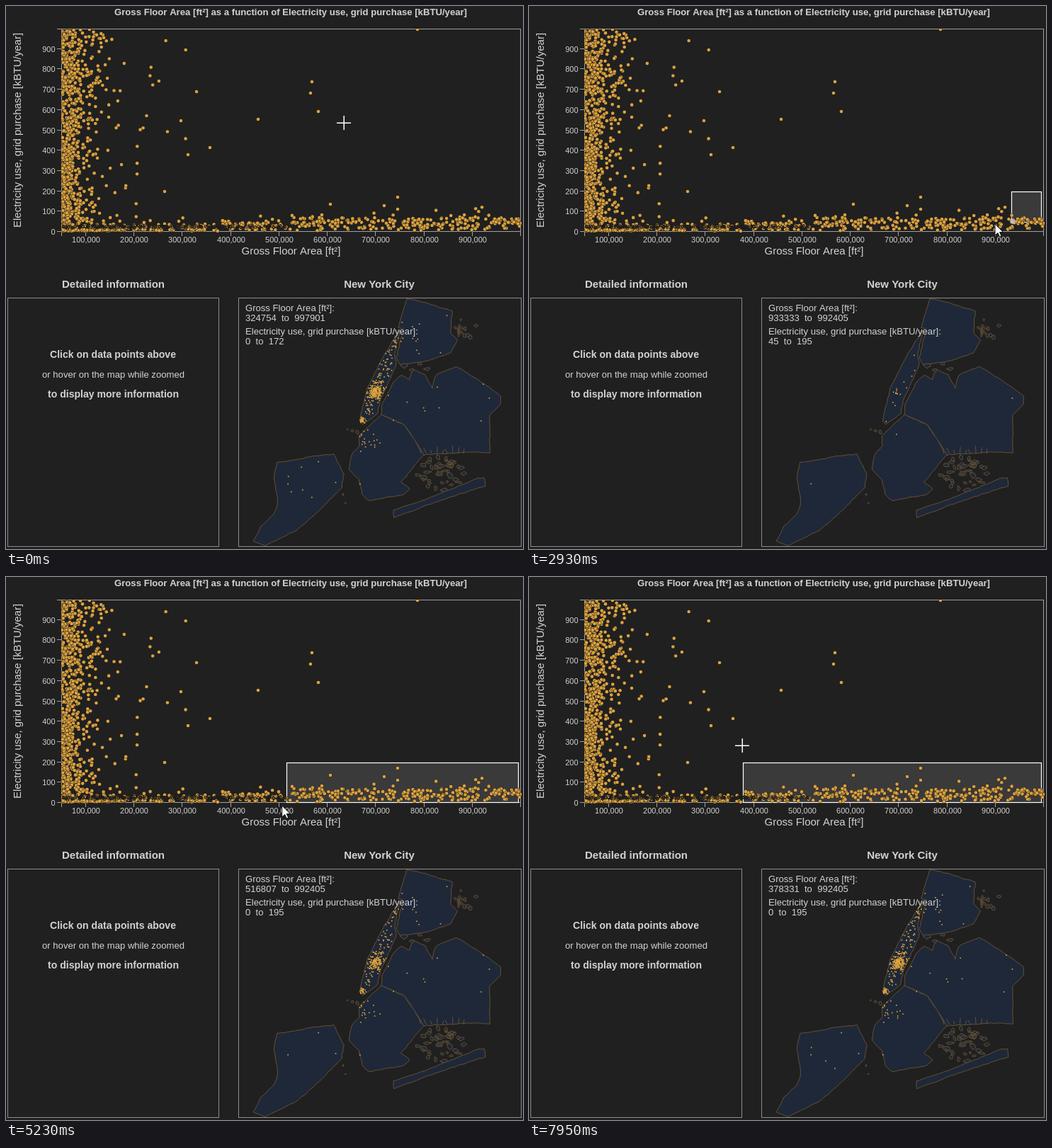
Animation, 730 px wide and 767 px high, one loop 8000 ms. Source, as an HTML page with a canvas:

```html
<!DOCTYPE html>
<html lang="en">
<head>
<meta charset="utf-8">
<title>Building energy explorer</title>
<style>
html, body { margin: 0; width: 100%; height: 100%; overflow: hidden; background: #202020; }
canvas { display: block; width: 730px; height: 767px; }
</style>
</head>
<body>
<canvas id="stage" width="730" height="767"></canvas>
<script>
const W = 730, H = 767, LOOP = 8000;
const FONT = '"Liberation Sans", Arial, sans-serif';
const BG = '#202020', LAND = '#1e2839', COAST = '#665031', DOT = '#dca23f', TEXT = '#d2d2d2', FRAME = '#8c8c8c';
const plot = { l: 78, t: 32, r: 727, b: 319 };
const stage = document.getElementById('stage').getContext('2d');

function layer(paint) {
  const c = document.createElement('canvas');
  c.width = W; c.height = H;
  paint(c.getContext('2d'));
  return c;
}

// ---- seeded random numbers ----
let seed = 41;
function rnd() {
  seed = (seed + 0x6D2B79F5) | 0;
  let t = Math.imul(seed ^ (seed >>> 15), 1 | seed);
  t = (t + Math.imul(t ^ (t >>> 7), 61 | t)) ^ t;
  return ((t ^ (t >>> 14)) >>> 0) / 4294967296;
}
const between = (a, b) => a + (b - a) * rnd();
const gauss = (m, s) => m + s * (rnd() + rnd() + rnd() + rnd() - 2) * 1.73;
const decay = scale => -Math.log(1 - rnd() * 0.97) * scale;

// ---- scales ----
const areaX = v => plot.l + 0.4 + (v - 50000) / 1463.8;
const useY = v => plot.b - v * 0.287;

function label(g, text, x, y, size, align = 'center', bold = false) {
  g.font = (bold ? 'bold ' : '') + size + 'px ' + FONT;
  g.textAlign = align;
  g.fillStyle = TEXT;
  g.fillText(text, x, y);
}

// ---- map: a few corners per borough, the ragged coast is added ----
const boroughs = [
  [556,458, 549,492, 551,508, 528,558, 525,576, 504,591, 499,586, 510,540, 523,514, 538,486],
  [566,413, 592,419, 630,431, 628,462, 638,472, 628,490, 592,502, 556,507, 551,497, 561,456, 554,454],
  [548,530, 558,521, 570,527, 574,513, 592,521, 602,540, 607,521, 636,509, 665,527, 699,551, 698,563,
    683,578, 683,631, 652,630, 590,634, 563,592, 530,577, 531,562],
  [530,577, 563,592, 590,634, 558,672, 570,682, 562,690, 512,699, 503,690, 498,669, 484,655, 488,634,
    499,622, 498,607, 526,581],
  [383,645, 434,636, 463,633, 477,661, 474,680, 442,713, 410,741, 366,762, 349,756, 360,735, 378,718,
    384,701, 378,666],
  [547,712, 592,697, 666,667, 676,667, 676,678, 600,703, 548,723]
];

function coast(path, pts, rough) {
  for (let i = 0; i < pts.length; i += 2) {
    const j = (i + 2) % pts.length;
    const dx = pts[j] - pts[i], dy = pts[j + 1] - pts[i + 1];
    const n = Math.max(1, Math.round(Math.hypot(dx, dy) / 5));
    for (let k = 0; k < n; k++) {
      const x = pts[i] + dx * k / n + between(-rough, rough);
      const y = pts[i + 1] + dy * k / n + between(-rough, rough);
      if (i + k === 0) path.moveTo(x, y); else path.lineTo(x, y);
    }
  }
  path.closePath();
}

function islet(path, x, y, rx, ry) {
  const pts = [];
  for (let a = 0; a < 6.2; a += Math.PI / 4) {
    const r = between(0.6, 1.2);
    pts.push(x + rx * r * Math.cos(a), y + ry * r * Math.sin(a));
  }
  coast(path, pts, 0.3);
}

const land = boroughs.map(pts => { const p = new Path2D(); coast(p, pts, 0.6); return p; });
const islets = new Path2D();
for (let i = 0; i < 38; i++) {
  const a = between(0, 2 * Math.PI), r = Math.sqrt(rnd());
  islet(islets, 615 + 34 * r * Math.cos(a), 660 + 24 * r * Math.sin(a), between(1.5, 6), between(1.5, 4.5));
}
for (let i = 0; i < 14; i++) islet(islets, gauss(645, 8), gauss(461, 8), between(1, 3), between(1.5, 4));
for (let i = 0; i < 4; i++) islet(islets, 562 + 11 * i, gauss(513, 3), between(3, 6), between(2, 4));
for (let i = 0; i < 3; i++) islet(islets, 482 + 7 * i, 598 + 2 * i, 1 + i, 1 + i * 0.8);
for (let i = 0; i < 2; i++) islet(islets, 476 + 3 * i, 690 + 12 * i, 1, 2 - i);

// ---- scatter data ----
const points = [];
const add = (n, make) => { for (let i = 0; i < n; i++) points.push(make()); };
// small buildings crowd the left edge, thinning out to the right
add(690, () => {
  const y = between(33, 312);
  return { x: 79 + decay(19 - 6 * (y - 33) / 283), y };
});
add(70, () => ({ x: 118 + decay(50), y: between(33, 300) }));
// low use along the floor, rising with area
add(560, () => {
  const f = Math.pow(rnd(), 1.15), rise = Math.min(1, f * 1.5);
  const stray = rnd() < 0.08 ? between(4, 12) : 0;
  return { x: plot.l + 649 * f, y: plot.b - 1 - decay(2 + 2 * rise) - rnd() * 15 * rise - stray };
});
const lone = [432,107, 430,123, 441,149, 356,160, 288,200, 257,210, 224,262, 553,270, 553,287, 534,282, 458,280, 581,33];
for (let i = 0; i < lone.length; i += 2) points.push({ x: lone[i], y: lone[i + 1] });

// Picks a neighbourhood: midtown, downtown, uptown, then the outer boroughs.
function place() {
  const r = rnd(), k = rnd();
  if (r < 0.46) return [gauss(523, 5.5), gauss(544, 7)];
  if (r < 0.57) return [gauss(503, 2), gauss(586, 2.5)];
  if (r < 0.82) return [gauss(508 + 48 * k, 5), 578 - 112 * k];
  if (r < 0.89) return [gauss(507, 8), gauss(607, 11)];
  if (r < 0.94) return [between(552, 635), between(418, 500)];
  if (r < 0.985) return [between(490, 690), between(515, 695)];
  return [between(390, 470), between(636, 705)];
}
const sites = points.filter(p => p.x > 260);
for (const p of sites) {
  do p.spot = place(); while (!land.some(l => stage.isPointInPath(l, ...p.spot)));
}

// ---- static layers ----
function drawMap(g) {
  g.save();
  g.beginPath();
  g.rect(329, 413, 398, 350);
  g.clip();
  g.lineJoin = 'round';
  g.fillStyle = LAND;
  g.strokeStyle = COAST;
  for (const p of [...land, islets]) { g.fill(p); g.stroke(p); }
  g.beginPath();
  for (let x = 586; x < 650; x += 7.5) {
    g.moveTo(x, 632);
    g.lineTo(x + between(-4, 2), 632 - between(4, 11));
  }
  g.stroke();
  g.restore();
}

function drawAxes(g) {
  g.strokeStyle = '#a0a0a0';
  g.strokeRect(78.5, 32.5, 648, 286);
  g.beginPath();
  const tickX = x => { g.moveTo(x, 319); g.lineTo(x, 325); };
  const tickY = y => { g.moveTo(72, y); g.lineTo(78, y); };
  tickX(78.5); tickX(726.5); tickY(32.5);
  for (let i = 0; i < 10; i++) {
    const y = Math.round(useY(i * 100)) - 0.5;
    tickY(y);
    label(g, String(i * 100), 69.5, y + 4, 11, 'right');
    if (!i) continue;
    const x = Math.round(areaX(i * 1e5)) - 0.5;
    tickX(x);
    label(g, i + '00,000', x + 0.5, 334, 11);
  }
  g.stroke();
}

const base = layer(g => {
  g.fillStyle = BG;
  g.fillRect(0, 0, W, H);
  drawMap(g);
  g.strokeStyle = FRAME;
  g.strokeRect(2.5, 412.5, 298, 351);
  g.strokeRect(328.5, 412.5, 399, 351);
  drawAxes(g);

  const area = 'Gross Floor Area [ft²]', use = 'Electricity use, grid purchase [kBTU/year]';
  label(g, area + ' as a function of ' + use, 402, 13, 13.15, 'center', true);
  label(g, area, 402.5, 351, 15);
  g.save();
  g.translate(21, 175.5);
  g.rotate(-Math.PI / 2);
  label(g, use, 0, 0, 15);
  g.restore();
  label(g, 'Detailed information', 151.5, 398, 15, 'center', true);
  label(g, 'New York City', 527, 398, 15, 'center', true);
  label(g, 'Click on data points above', 151, 497, 14.05, 'center', true);
  label(g, 'or hover on the map while zoomed', 151.5, 525, 13.1);
  label(g, 'to display more information', 151.5, 553, 14.05, 'center', true);
  label(g, area + ':', 338, 431, 13.1, 'left');
  label(g, use + ':', 338, 464, 13.1, 'left');
});

const dots = layer(g => {
  g.beginPath();
  g.rect(plot.l, plot.t, 650, 288);
  g.clip();
  g.fillStyle = DOT;
  g.strokeStyle = '#1c1c1c';
  const ring = (x, y, r) => { g.beginPath(); g.arc(x, y, r, 0, 7); g.stroke(); };
  for (const p of points) {
    ring(p.x, p.y, 2.3);
    g.fill();
  }
  // crowded dark marks along the floor
  for (let i = 0; i < 200; i++) ring(plot.l + 320 * rnd(), gauss(312, 1.3), 1.7);
});

// ---- motion: [time, x, y] and [time, lowest area, lowest use] ----
const cursorKeys = [[170, 477, 165], [950, 695, 257], [1850, 722, 265], [1950, 722, 265], [2930, 658, 308],
  [3690, 570, 315], [4590, 436, 323], [5890, 342, 323], [7010, 303, 322], [7390, 302, 322], [7950, 301, 238]];
const brushKeys = [[1950, 992405, 192], [2930, 933333, 45], [3690, 798704, 28], [4590, 587144, 0],
  [5890, 444272, 0], [7010, 378331, 0]];

function at(keys, t) {
  const i = keys.findIndex(k => k[0] > t);
  if (i === 0) return keys[0].slice(1);
  if (i < 0) return keys[keys.length - 1].slice(1);
  const a = keys[i - 1], b = keys[i];
  const k = (t - a[0]) / (b[0] - a[0]);
  return a.slice(1).map((v, j) => v + (b[j + 1] - v) * k);
}

function selection(t) {
  if (t < 1950) return { a0: 324754, a1: 997901, e0: 0, e1: 172 };
  const [a0, e0] = at(brushKeys, t).map(Math.round);
  return { a0, a1: 992405, e0, e1: 195 };
}

function drawCross(g, x, y) {
  g.fillStyle = '#fff';
  g.fillRect(x - 10, y - 0.5, 20, 1.5);
  g.fillRect(x - 0.5, y - 10, 1.5, 20);
}

const arrow = new Path2D('M0 0V16L4 12.5 6.5 18 9 17 6.5 11.5H11.5Z');
function drawArrow(g, x, y) {
  g.save();
  g.translate(x, y);
  g.fillStyle = '#fff';
  g.strokeStyle = '#111';
  g.lineWidth = 1;
  g.fill(arrow);
  g.stroke(arrow);
  g.restore();
}

function draw(t) {
  const g = stage, s = selection(t);
  const l = areaX(s.a0), r = areaX(s.a1) + 0.5, top = useY(s.e1), bottom = useY(s.e0);
  const brushing = t >= 2050;
  g.drawImage(base, 0, 0);

  if (brushing) {
    const x = Math.round(l) - 0.5, y = Math.round(top) - 0.5;
    const box = [x, y, Math.round(r) + 0.5 - x, Math.round(bottom) - 0.5 - y];
    g.fillStyle = 'rgba(119,119,119,0.3)';
    g.fillRect(...box);
    g.strokeStyle = '#fff';
    g.lineWidth = 1.2;
    g.strokeRect(...box);
  }
  g.drawImage(dots, 0, 0);
  if (brushing && s.e0 > 0) {
    g.fillStyle = 'rgba(200,200,195,0.85)';
    g.beginPath();
    g.arc(l + 1, bottom - 2, 3.8, 0, 7);
    g.fill();
  }

  g.fillStyle = '#e3a63d';
  for (const p of sites) {
    if (p.x >= l && p.x <= r && p.y >= top && p.y <= bottom) g.fillRect(p.spot[0] - 0.8, p.spot[1] - 0.8, 1.6, 1.6);
  }
  label(g, s.a0 + '  to  ' + s.a1, 338, 445, 13.1, 'left');
  label(g, s.e0 + '  to  ' + s.e1, 338, 478, 13.1, 'left');

  const pointer = brushing && t < 7450 ? drawArrow : drawCross;
  pointer(g, ...at(cursorKeys, t));
}

function frame() {
  const t = performance.now() % LOOP;
  draw(t - t % 10);
  requestAnimationFrame(frame);
}
frame();
</script>
</body>
</html>
```
